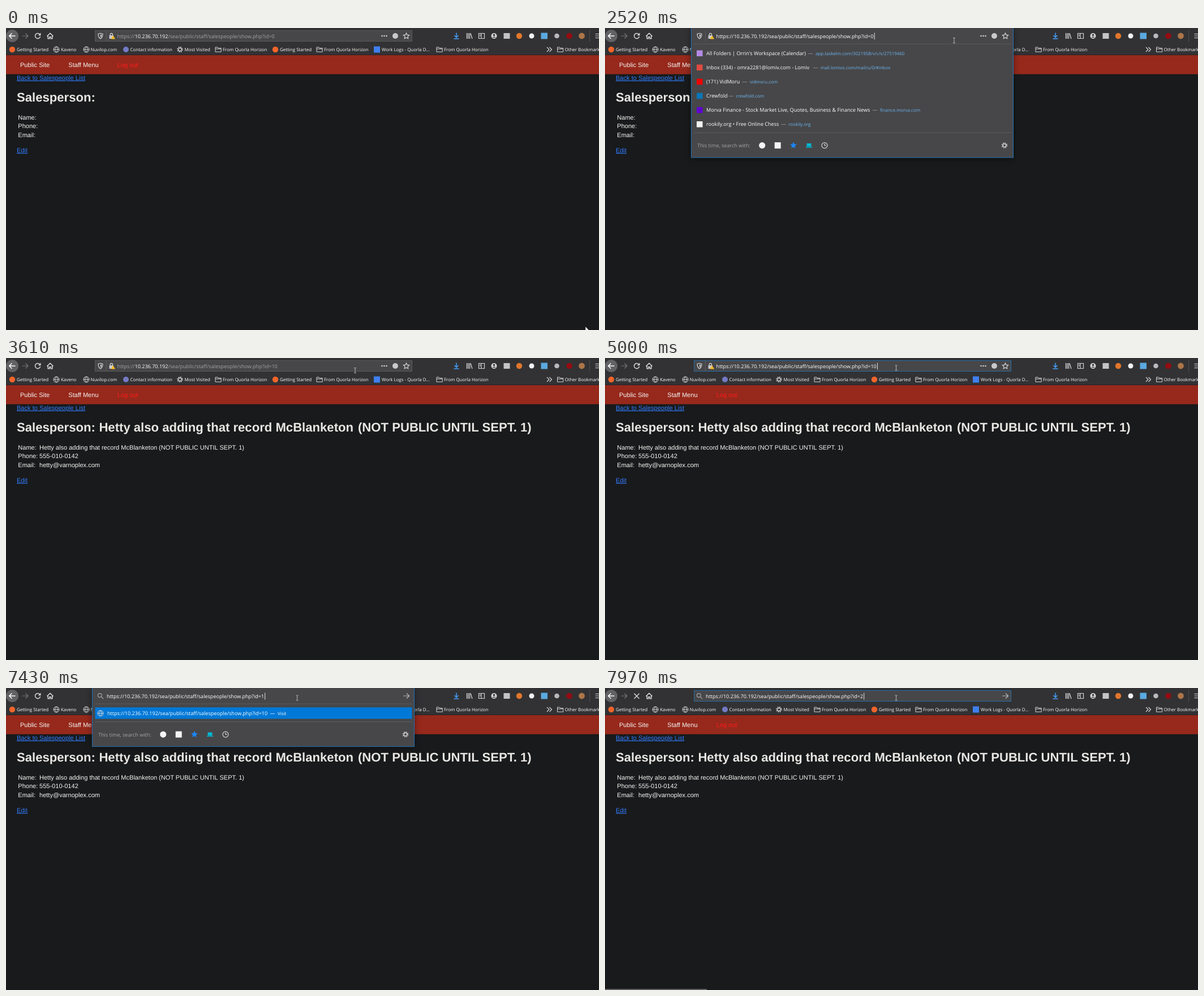
Write an HTML page that moves like this. It is 1048 by 534 pixels and loops after 8000 ms.

```html
<!DOCTYPE html>
<html lang="en">
<head>
<meta charset="utf-8">
<title>Salesperson page</title>
<style>
  html, body { margin: 0; width: 100%; height: 100%; overflow: hidden; background: #181a1b; }
  svg { display: block; }
  text { white-space: pre; text-rendering: geometricPrecision; }
  .ui { font: 9.06px "Open Sans", "Noto Sans", sans-serif; fill: #fff; }
  .small { font: 7.95px "Open Sans", "Noto Sans", sans-serif; fill: #fff; }
  .page { font: 11.05px "Liberation Sans", Arial, sans-serif; fill: #f6f5f3; }
  .head { font: bold 22.12px "Liberation Sans", Arial, sans-serif; fill: #e8e6e3; }
  .link { fill: #337cff; text-decoration: underline; }
  .out { fill: #ff1a1a; }
  .blue { fill: #6cb5f0; }
  .dim { fill: #a3a3a7; }
  .bold { font-weight: 700; font-size: 9.2px; }
  .line { fill: none; stroke: #d6d6d8; stroke-width: 1.2; }
  .menu { fill: #474749; stroke: #1f72b8; filter: drop-shadow(0 2px 6px #0006); }
</style>
</head>
<body>
<svg width="1048" height="534" viewBox="0 0 1048 534">
  <g id="page"></g><g id="chrome"></g><g id="bar"></g><g id="pointer"></g>
</svg>
<script>
const LOOP = 8000;
const HOST = '10.236.70.192';
const PATH = '/sea/public/staff/salespeople/show.php?id=';
const PERSON = 'Hetty also adding that record McBlanketon';

const text = (x, y, s, cls = 'ui') => `<text x="${x}" y="${y}" class="${cls}">${s}</text>`;
const rect = (x, y, w, h, fill, more = '') =>
  `<rect x="${x}" y="${y}" width="${w}" height="${h}" fill="${fill}" ${more}/>`;
const disc = (x, y, r, fill) => `<circle cx="${x}" cy="${y}" r="${r}" fill="${fill}"/>`;
const line = (d, more = '') => `<path d="${d}" class="line" ${more}/>`;
const fill = (d, color) => `<path d="${d}" fill="${color}"/>`;
const at = (x, y, s) => `<g transform="translate(${x} ${y})">${s}</g>`;

const globe = (x, y) => at(x, y,
  line('M-5 0a5 5 0 1 0 10 0a5 5 0 1 0-10 0M-5 0h10M0-5c-3 3-3 7 0 10c3-3 3-7 0-10', 'style="stroke-width:1"'));
const folder = (x, y) => at(x, y,
  line('M-5-4h4l1.2 1.6h5v6.6h-10.2zM-5-1h10', 'style="stroke-width:1"'));
const gear = (x, y) => at(x, y,
  '<circle r="2.7" class="line"/><circle r="4.3" class="line" style="stroke-width:1.8" stroke-dasharray="1.7 1.68"/>');
const clock = (x, y) => at(x, y, '<circle r="5" class="line"/>' + line('M0-3V0h2.6'));
const star = (x, y, r) => 'M' + Array.from({ length: 10 }, (_, i) => {
  const a = (i / 5 - .5) * Math.PI, k = i % 2 ? r * .48 : r;
  return (x + k * Math.cos(a)).toFixed(1) + ' ' + (y + k * Math.sin(a)).toFixed(1);
}).join('L') + 'z';

// Toolbar and bookmarks
function drawChrome() {
  const mark = (x, s) => text(x, 41, s, 'small');
  const old = 'From Quorla Horizon';
  return rect(0, 0, 1048, 48, '#323234') + rect(0, 47.4, 1048, .6, '#1c1c1e') +
    disc(11, 14, 11, '#626265') + line('M16.5 14H6M10.5 9.3L5.8 14l4.7 4.7', 'style="stroke:#fff;stroke-width:1.5"') +
    line('M28.5 14H39M34.5 9.5L39 14l-4.5 4.5', 'style="stroke:#77777b"') +
    line('M72.5 14.6L78 9.2l5.5 5.4M74.2 14v4.8h2.6v-3h2.4v3h2.6V14', 'style="stroke-width:1.5"') +
    line('M796 8.5v8M792.5 13l3.5 3.7 3.5-3.7M791.5 19h9', 'style="stroke:#45a1ff;stroke-width:1.5"') +
    line('M814.5 9v10M817 9v10M819.5 9v10M821 9.5l3 9.5', 'style="stroke-width:1.3"') +
    line('M835.5 9.5h10v9h-10zM840 9.5v9M837 12h2M837 14h2') +
    disc(862.5, 14, 5, '#d6d6d8') + disc(862.5, 12.4, 1.8, '#323234') + fill('M859.3 17a3.4 2.2 0 0 1 6.4 0z', '#323234') +
    rect(879.5, 9, 11, 10, '#c4c4c6') + disc(907, 14, 5.2, '#e2762b') + disc(929, 14, 4.5, '#f2f2f2') +
    rect(945.5, 8.5, 11.5, 11, '#5aa9e0') + disc(973.5, 14, 4.3, '#b9babd') +
    disc(995.5, 14, 5.3, '#930d13') + disc(1017.5, 14, 5.4, '#ad7548') +
    rect(1031, 3, 1, 22, '#4c4c4f') + line('M1041.5 10.5h8M1041.5 14h8M1041.5 17.5h8') +
    disc(11, 38, 5.2, '#f0642b') + mark(19, 'Getting Started') +
    globe(89, 38) + mark(97, 'Kaveno') + globe(142, 38) + mark(149.5, 'Nuvilop.com') +
    disc(212, 38, 5, '#7479c4') + mark(219.5, 'Contact information') +
    gear(307.5, 38) + mark(315.5, 'Most Visited') +
    folder(375, 38) + mark(383, old) +
    disc(476, 38, 5.2, '#f0642b') + mark(484, 'Getting Started') +
    folder(554, 38) + mark(562, old) +
    rect(650, 32.5, 11, 11, '#3f7fee') + mark(664, 'Work Logs - Quorla D...') +
    folder(766, 38) + mark(774, old) +
    line('M956 34l4 4-4 4M960.5 34l4 4-4 4') + folder(979.5, 38) + mark(987.5, 'Other Bookmarks');
}

function drawPage(found) {
  const rest = '(NOT PUBLIC UNTIL SEPT. 1)';
  const value = (y, s) => text(59, y, s, 'page');
  return rect(0, 48, 1048, 33.7, '#96291c') +
    text(25, 69.3, 'Public Site', 'page') + text(110.3, 69.3, 'Staff Menu', 'page') + text(196.8, 69.3, 'Log out', 'page out') +
    text(19, 91.9, 'Back to Salespeople List', 'page link') + text(19, 129.7, 'Salesperson:', 'head') +
    text(21.3, 161.8, 'Name:', 'page') + text(21.3, 177.3, 'Phone:', 'page') + text(21.3, 192.8, 'Email:', 'page') +
    text(19, 220.1, 'Edit', 'page link') +
    (found ? text(164.4, 129.7, PERSON, 'head') + text(622, 129.7, rest, 'head') +
      value(161.8, PERSON) + text(270, 161.8, rest, 'page') +
      value(177.3, '555-010-0142') + value(192.8, 'hetty@varnoplex.com') : '');
}

// Suggestion rows: title, address, address x, icon colour
const sites = [
  ["All Folders | Orrin's Workspace (Calendar)", 'app.taskelm.com/3021958/v/c/s/27519460', 372, '#b58ae6'],
  ['Inbox (334) - omra2281@lomiv.com - Lomiv', 'mail.lomivo.com/mail/u/0/#inbox', 381, '#e04a3f'],
  ['(171) VidMoru', 'vidmoru.com', 256, '#f00000'],
  ['Crewfold', 'crewfold.com', 231.5, '#0a76b8'],
  ['Morva Finance - Stock Market Live, Quotes, Business &amp; Finance News', 'finance.morva.com', 486, '#5f01d1'],
  ['rookily.org • Free Online Chess', 'rookily.org', 324.5, '#f2f2f2'],
];
const staff = (name, id, x) => ['Staff: Salesperson ' + name, HOST + PATH + id, x];
const known = [
  staff('CSRF attack RED TARGET IS VULN...', '1', 419.5),
  staff('Milon Tarke', '1=1"OR"TRUE', 325),
  staff('XSS IDOR', '12', 312.5),
];
const address = id => 'https://' + HOST + PATH + id;
const visit = (title, x) => [title, 'Visit', x];
const lists = {
  sites,
  many: [visit(address(''), 470), ...known, ...[2, 3, 4, 5, 6, 7].map(n => staff('', n, 271))],
  few: [visit(`<tspan class="bold">${address(1)}</tspan>0`, 502), ...known],
  one: [visit(address(10), 480)],
};

function drawRow([title, url, x, color], i) {
  const y = 44.7 + i * 25.1, first = url === 'Visit';
  return (first ? rect(157.5, y - 10.5, 560, 20.3, '#0078d7') : '') +
    (color ? rect(162, y - 5.2, 10.5, 10.5, color) : globe(167, y)) +
    text(179, y + 3.2, title) + text(x - 13.6, y + 3.2, '—', first ? 'ui' : 'ui dim') +
    text(x, y + 3.2, url, first ? 'small' : 'small blue');
}

function drawMenu(rows) {
  const bottom = 78.5 + rows.length * 25.1, y = bottom - 21.5;
  return `<rect x="152.5" y="-3" width="569" height="${bottom + 3}" class="menu"/>` +
    rect(157, 27.5, 561, 1, '#5d5d60') + rect(157, bottom - 44.5, 561, 1, '#5d5d60') +
    rows.map(drawRow).join('') + text(163, y + 3.6, 'This time, search with:', 'ui dim') +
    disc(277.7, y, 5.6, '#f4f4f4') + rect(299.7, y - 5.5, 11, 11, '#f4f4f4') +
    fill(star(333, y, 6.2), '#1b86f5') +
    fill(`M356.5 ${y - 3.5}h8v5.5h-8zM355 ${y + 2.3}h11v1.7h-11z`, '#00b7d4') +
    clock(388, y) + gear(706, y);
}

// Address bar: start time, typed id, flags, suggestion list
const states = [
  [0, '0', ''],
  [1740, '0', 'focus caret'],
  [1800, '0', 'focus all', 'sites'],
  [2520, '0', 'focus caret', 'sites'],
  [2970, '', 'focus typed caret', 'many'],
  [3130, '10', 'focus typed last', 'many'],
  [3260, '10', 'focus typed last', 'few'],
  [3410, '10', 'focus typed'],
  [3480, '10', 'focus typed busy status'],
  [3550, '10', 'found busy'],
  [3610, '10', 'found'],
  [5000, '10', 'found focus caret'],
  [5060, '10', 'found focus all', 'sites'],
  [5420, '10', 'found focus typed caret', 'sites'],
  [6500, '10', 'found focus typed all', 'sites'],
  [6530, '10', 'found focus typed all'],
  [6900, '10', 'found focus typed caret'],
  [7430, '1', 'found focus typed caret', 'one'],
  [7500, '', 'found focus typed caret', 'many'],
  [7600, '2', 'found focus typed caret', 'many'],
  [7700, '2', 'found focus typed caret'],
  [7900, '2', 'found focus typed caret busy'],
  [7970, '2', 'found focus typed caret busy status'],
];

function drawBar([, id, flags, list]) {
  const has = flag => flags.includes(flag);
  const x = has('typed') ? 178.1 : 196.6, end = x + 274 + 5.2 * id.length;
  let s = list ? drawMenu(lists[list])
    : rect(157.5, 4.5, 560, 19, '#474749', `stroke="${has('focus') ? '#2a6ba3' : '#5a5a5d'}"`);

  s += has('busy') ? line('M51.5 9.7l9 9M60.5 9.7l-9 9', 'style="stroke-width:1.5"')
    : line('M59.6 11A4.6 4.6 0 1 0 60.6 15', 'style="stroke-width:1.5"') + fill('M61.5 8.5v4.7h-4.7z', '#d6d6d8');

  if (has('typed')) {
    s += line('M169.2 13a3.4 3.4 0 1 1-6.8 0a3.4 3.4 0 1 1 6.8 0M168.3 15.4l4 3.8', 'style="stroke:#a3a3a7"') +
      line('M702 14h10.5M708 9.5l4.6 4.5-4.6 4.5', 'style="stroke:#b9b9bc"');
  } else {
    s += line('M167 9.3l4 1.2c0 4-1 6.6-4 8.4-3-1.8-4-4.4-4-8.4z') + fill('M167 11.3l2.2.7c0 2.3-.6 3.8-2.2 5z', '#d6d6d8') +
      rect(177, 5, 1, 18, '#5d5d60') +
      rect(182.5, 13, 7.5, 6, '#c9c9cb') + line('M184.2 13v-1.6a2.1 2.1 0 0 1 4.2 0V13') +
      fill('M189.3 13.2l3.8 6.3h-7.6z', '#ffbf1f') +
      [664.5, 668.5, 672.5].map(c => disc(c, 14, 1.3, '#d6d6d8')).join('') +
      disc(688, 14, 5, '#c9c9cb') + line(star(707.5, 14.3, 5.4));
  }

  const selected = color => `<tspan fill="${color}">`;
  if (has('all')) {
    s += rect(x - .3, 8, end - x + .5, 13, '#f3f8fd') + text(x, 18, selected('#1b78cf') + address(id) + '</tspan>');
  } else if (has('last')) {
    s += rect(end - 5.4, 8, 5.6, 13, '#f3f8fd') +
      text(x, 18, address(id.slice(0, -1)) + selected('#1b78cf') + id.slice(-1) + '</tspan>');
  } else if (has('focus')) {
    s += text(x, 18, address(id));
  } else {
    s += text(x, 18, `<tspan class="dim">https://</tspan>${HOST}<tspan class="dim">${PATH + id}</tspan>`);
  }
  if (has('caret')) s += rect(end, 8.5, .9, 12, '#f4f4f5');
  if (has('status')) s += rect(0, 532, 180, 2, '#5c5c5f');
  return s;
}

// Pointer path: time, x, y
const path = [
  [0, 1024, 528], [50, 1020, 520], [450, 538, 230], [830, 640, 56], [890, 640, 56], [1130, 826, 110],
  [1350, 690, 234], [1500, 548, 120], [1670, 617, 22], [4500, 617, 22], [4720, 940, 110], [4950, 514.6, 17.5], [LOOP, 514.6, 17.5],
];

function drawPointer(t) {
  const i = path.findIndex(p => p[0] > t), [t0, x0, y0] = path[i - 1], [t1, x1, y1] = path[i];
  const k = (t - t0) / (t1 - t0), x = x0 + (x1 - x0) * k, y = y0 + (y1 - y0) * k;
  const beam = y < 26 && x > 157 && x < 718;
  return at(x.toFixed(1), y.toFixed(1), beam
    ? line('M-2-4.5h1.4L0-4l.6-.5H2M0-4V4M-2 4.5h1.4L0 4l.6.5H2', 'style="stroke-width:.8"')
    : '<path d="M0 0v11l2.6-2.4 1.7 3.9 1.7-.7-1.7-3.8h3.6z" fill="#fff" stroke="#111" stroke-width=".5"/>');
}

const layer = id => document.getElementById(id);
let shown;
function frame() {
  const t = performance.now() % LOOP;
  const state = states.findLast(s => s[0] <= t);
  if (state !== shown) {
    shown = state;
    layer('page').innerHTML = drawPage(state[2].includes('found'));
    layer('bar').innerHTML = drawBar(state);
  }
  layer('pointer').innerHTML = drawPointer(t);
  requestAnimationFrame(frame);
}
layer('chrome').innerHTML = drawChrome();
frame();
</script>
</body>
</html>
```
